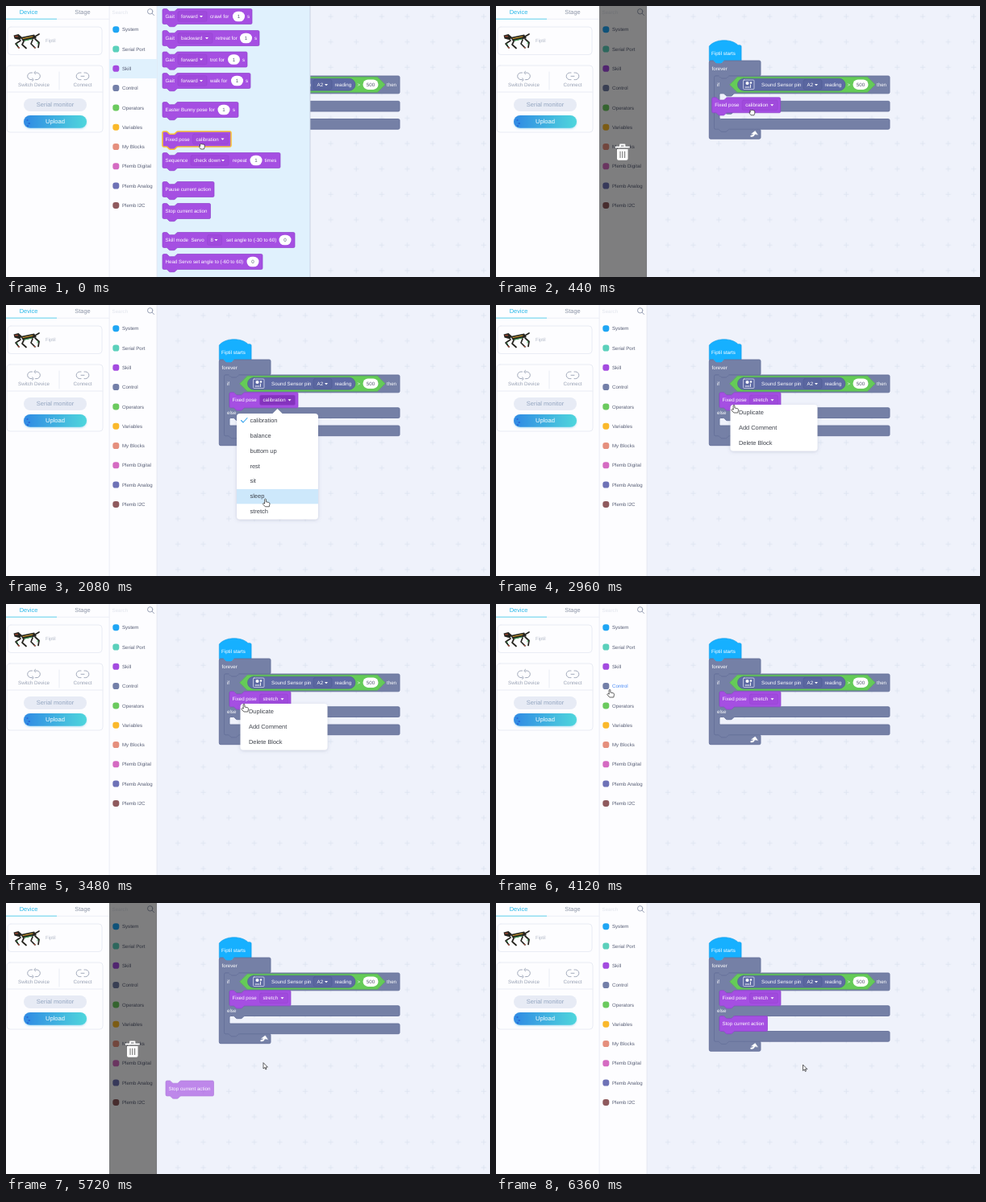
These frames come from a looping animation (600x337 px, 6.56 s). An HTML page:

```html
<!DOCTYPE html>
<html lang="en">
<head>
<meta charset="utf-8">
<title>Block editor</title>
<style>
html, body { margin: 0; width: 100%; height: 100%; overflow: hidden; background: #eff2fb; }
svg { display: block; width: 600px; height: 337px; }
text { font-family: "Liberation Sans", Arial, sans-serif; white-space: pre; text-rendering: geometricPrecision; }
</style>
</head>
<body>
<svg id="stage" viewBox="0 0 600 337" xmlns="http://www.w3.org/2000/svg">
  <defs>
    <pattern id="grid" x="197" y="-3" width="31.6" height="31.6" patternUnits="userSpaceOnUse">
      <path d="M12.8 16h6.4M16 12.8v6.4" stroke="#dbe1ef" stroke-width=".8"/>
    </pattern>
    <linearGradient id="upload"><stop stop-color="#2f8ae4"/><stop offset="1" stop-color="#4fd6dc"/></linearGradient>
    <filter id="shadow" x="-10%" y="-10%" width="120%" height="125%">
      <feDropShadow dx="0" dy="1" stdDeviation="2" flood-color="#5a6488" flood-opacity=".25"/>
    </filter>
    <filter id="glow" x="-10%" y="-30%" width="120%" height="180%">
      <feDropShadow dx="0" dy="1" stdDeviation="1.3" flood-color="#6cc4ea" flood-opacity=".5"/>
    </filter>
  </defs>
  <rect width="600" height="337" fill="#eff2fb"/>
  <rect x="187" width="413" height="337" fill="url(#grid)"/>
  <g id="script"></g>
  <g id="flyout"></g>
  <g id="categories"></g>
  <g id="trash"></g>
  <g id="device"></g>
  <g id="dragged"></g>
  <g id="menu"></g>
  <g id="cursor"></g>
</svg>
<script>
const LOOP = 6560;
const PURPLE = '#a54fe2', SLATE = '#7580a6', SLATE_EDGE = '#66719a', PANEL = '#fdfdff';

// ---- drawing helpers ----
const text = (x, cy, s, fill = '#fff', size = 6.2, anchor = 'start') =>
  `<text x="${x}" y="${cy + size * .35}" fill="${fill}" text-anchor="${anchor}" font-size="${size}">${s}</text>`;
const rect = (x, y, w, h, r, fill, extra = '') =>
  `<rect x="${x}" y="${y}" width="${w}" height="${h}" rx="${r}" fill="${fill}" ${extra}/>`;
const path = (d, fill, extra = '') => `<path d="${d}" fill="${fill}" ${extra}/>`;
const stroke = (color, width) => `stroke="${color}" stroke-width="${width}" stroke-linejoin="round" stroke-linecap="round"`;
const caret = (x, cy) => path(`M${x - 2} ${cy - 1}h4l-2 2.3z`, '#fff');

const NOTCH = 'c.8 0 1.2.4 1.6.8l1.6 1.6c.4.4.8.8 1.6.8h4.7c.8 0 1.2-.4 1.6-.8l1.6-1.6c.4-.4.8-.8 1.6-.8';
const NUB = 'c-.8 0-1.2.4-1.6.8l-1.6 1.6c-.4.4-.8.8-1.6.8h-4.7c-.8 0-1.2-.4-1.6-.8l-1.6-1.6c-.4-.4-.8-.8-1.6-.8';
const topEdge = (x, y, w) => `M${x} ${y + 1.6}a1.6 1.6 0 0 1 1.6-1.6h3.1${NOTCH}H${x + w - 1.6}a1.6 1.6 0 0 1 1.6 1.6`;
const bottomEdge = (x, y, nub) => `V${y - 1.6}a1.6 1.6 0 0 1-1.6 1.6` +
  (nub ? `H${x + 19}${NUB}` : '') + `H${x + 1.6}a1.6 1.6 0 0 1-1.6-1.6z`;

const stackPath = (x, y, w, h) => topEdge(x, y, w) + bottomEdge(x, y + h, true);

// slots: [top, bottom] of each mouth of a C-shaped block
function cPath(x, y, w, slots, bottom, nub) {
  const arm = x + 6.5;
  const mouths = slots.map(([a, b]) =>
    `V${a - 1.6}a1.6 1.6 0 0 1-1.6 1.6H${arm + 19}${NUB}H${arm + 1.6}a1.6 1.6 0 0 0-1.6 1.6` +
    `V${b - 1.6}a1.6 1.6 0 0 0 1.6 1.6H${x + w - 1.6}a1.6 1.6 0 0 1 1.6 1.6`).join('');
  return topEdge(x, y, w) + mouths + bottomEdge(x, bottom, nub);
}

// ---- purple blocks; parts: string label, dropdown {w, drop}, number {num} ----
function purpleBlock(x, y, w, parts, hover) {
  const cy = y + 9.5;
  const body = path(stackPath(x, y, w, 19), PURPLE, hover ? stroke('#f8c034', 1.6) : stroke('#8f42ca', .7));
  return body + parts.map(([dx, part]) => {
    const px = x + dx;
    if (typeof part === 'string') return text(px, cy, part);
    if (part.num) return rect(px, cy - 6.3, 15, 12.6, 6.3, '#fff') + text(px + 7.5, cy, part.num, '#575e75', 6.2, 'middle');
    return rect(px, cy - 6.3, part.w, 12.6, 1.8, part.open ? '#8433bd' : '#a04adc', stroke('#9342cf', .5)) +
      text(px + 4, cy, part.drop) + caret(px + part.w - 7, cy);
  }).join('');
}
const drop = (w, label, open) => ({ w, drop: label, open });
const num = n => ({ num: n });
const fixedPose = (x, y, label, open, hover) => {
  const w = label === 'stretch' ? 35 : 44;
  return purpleBlock(x, y, w + 41, [[3.5, 'Fixed pose'], [37.5, drop(w, label, open)]], hover);
};
const stopAction = (x, y, hover) => purpleBlock(x, y, 59.5, [[3.5, 'Stop current action']], hover);

const gait = (cy, way, dw, verb, at) =>
  [cy, at + 24, [[3.5, 'Gait'], [19, drop(dw, way)], [23 + dw, verb + ' for'], [at, num('1')], [at + 18, 's']]];
const SKILLS = [
  gait(13, 'forward', 36, 'crawl', 87),
  gait(40, 'backward', 43, 'retreat', 96),
  gait(66.5, 'forward', 36, 'trot', 81),
  gait(93, 'forward', 36, 'walk', 85),
  [129, 94, [[3.5, 'Easter Bunny pose for'], [68.5, num('1')], [87, 's']]],
  [192, 146, [[3.5, 'Sequence'], [35, drop(47, 'check down')], [87, 'repeat'], [108.5, num('1')], [126.5, 'times']]],
  [228, 64, [[3.5, 'Pause current action']]],
  [291, 164, [[3.5, 'Skill mode  Servo'], [55.5, drop(18, '8')], [79, 'set angle to (-30 to 60)'], [144.5, num('0')]]],
  [318, 124, [[3.5, 'Head Servo set angle to (-60 to 60)'], [104.5, num('0')]]],
];
const FIXED = { x: 194, y: 156 }, STOP = { x: 194, y: 245.5 };

function flyout(hover, missing) {
  return rect(187, 0, 190, 337, 0, '#e0f1fd') + path('M377 0V337', 'none', stroke('#c3cbdc', .8)) +
    SKILLS.map(([cy, w, parts]) => purpleBlock(194, cy - 9.5, w, parts)).join('') +
    (missing === 'fixed' ? '' : fixedPose(FIXED.x, FIXED.y, 'calibration', false, hover === 'fixed')) +
    (missing === 'stop' ? '' : stopAction(STOP.x, STOP.y, hover === 'stop'));
}

// ---- workspace script ----
function script(pose, open, stopped) {
  const elseTop = pose ? 127.8 : 118.3, elseEnd = elseTop + 12.7;
  const last = elseEnd + (stopped ? 19 : 9.5), end = last + 12.7;
  const edge = stroke(SLATE_EDGE, .9);
  return path('M264.3 68V50C272 40.5 292 40.5 300 48.7H302.5a1.6 1.6 0 0 1 1.6 1.6V68z', '#16b0ff', stroke('#139de8', .6)) +
    path(cPath(264.3, 68, 63.7, [[87, end]], end + 12, false), SLATE, edge) +
    path(cPath(270.5, 87, 217.5, [[108.8, elseTop], [elseEnd, last]], end, true), SLATE, edge) +
    path('M264.3 68h4.7' + NOTCH + 'z', '#16b0ff') +
    text(267, 59, 'Fiptil starts') + text(267.5, 77.5, 'forever') +
    text(274, 98, 'if') + text(274, elseTop + 6, 'else') + text(472, 98, 'then') +
    path('M289.8 97.7l9.5-9.5H460.5l9.5 9.5-9.5 9.5H299.3z', '#65cb58', stroke('#52b548', .6)) +
    rect(299.5, 90.2, 133.5, 15, 7.5, '#5f6ba5', stroke('#4d5890', .6)) +
    rect(306.5, 92, 13.5, 11.5, 1, '#5f6ba5', stroke('#e6e9f5', .7)) +
    '<circle cx="311.5" cy="96" r="2" fill="#fff"/><circle cx="316" cy="95.5" r="1.2" fill="#fff"/>' +
    path('M309 101h5M315.5 98v3.5', 'none', stroke('#fff', .9)) +
    text(329, 98, 'Sound Sensor pin') +
    rect(381, 91.8, 23, 11.8, 1.8, '#5a66a0', stroke('#4d5890', .5)) + text(385.5, 98, 'A2') + caret(397, 98) +
    text(407.5, 98, 'reading') + text(435.5, 98, '&gt;') +
    rect(442.5, 91.5, 19, 12.4, 6.2, '#fff') + text(452, 98, '500', '#575e75', 6.2, 'middle') +
    path(`M316.3 ${end + 8.6}q3.9 0 3.9-4`, 'none', stroke('#fff', 1.9)) +
    path(`M316.9 ${end + 5.6}l4.4-3.4 3 4.4z`, '#fff', stroke('#fff', .5)) +
    (pose ? fixedPose(277, 108.8, pose, open) : '') +
    (stopped ? stopAction(277, elseEnd) : '');
}

// ---- side panels ----
const CATEGORIES = [['System', '#1fa6f4'], ['Serial Port', '#5bd0bb'], ['Skill', '#a44be0'], ['Control', '#737fa8'],
  ['Operators', '#6bca5e'], ['Variables', '#fab92b'], ['My Blocks', '#e58f7d'], ['Plemb Digital', '#d56bc2'],
  ['Plemb Analog', '#6e72b6'], ['Plemb I2C', '#8f5a5d']];

function categories(hovered, isOpen) {
  return rect(128, 0, 59, 337, 0, PANEL) + path('M128 0V337M187 0V337', 'none', stroke('#e2e5ef', .8)) +
    (isOpen ? rect(128, 66, 59, 24, 0, '#e0f1fd') : '') +
    text(131.5, 7.5, 'Search', '#e1e4ec') +
    path('M181.2 9.3l2.3 2.3M181.9 6.8a3.2 3.2 0 1 1-6.4 0a3.2 3.2 0 1 1 6.4 0', 'none', stroke('#8d96ac', .9)) +
    CATEGORIES.map(([name, color], i) => {
      const cy = 29.2 + 24.3 * i;
      return rect(132.3, cy - 4, 8, 8, 3.1, color) +
        text(144, cy, name, name === hovered ? '#4a8bf5' : '#575e75', 6.1);
    }).join('');
}

function device() {
  const grey = '#98a1b3', card = stroke('#e9ecf4', 1);
  const link = x => path(`M${x - 2} 83h-1.500a4.300 4.300 0 0 0 0 8.600h1.500M${x + 2} 83h1.500a4.300 4.300 0 0 1 0 8.600h-1.500`, 'none', stroke('#a2aabb', 1));
  return rect(0, 0, 127.6, 337, 0, PANEL) + path('M0 16.3H127.5', 'none', stroke('#e9ecf4', .8)) +
    rect(0, 15.6, 63, 1.2, 0, '#7cdaf1') +
    text(28, 7, 'Device', '#27b8e8', 7.4, 'middle') + text(95, 7, 'Stage', '#8b93a5', 7.4, 'middle') +
    rect(2, 26, 117, 34.5, 4, PANEL, card) + dog() + text(49, 43, 'Fiptil', '#b3bac8', 6) +
    rect(1, 74, 119, 83, 4, PANEL, card) + path('M1 107H120M66 82V104', 'none', card) +
    link(34.5) + link(95) + path('M93 87.3h4M36.5 81.3l-1.800 1.700 1.800 1.700M32.500 89.900l1.800 1.700-1.800 1.700', 'none', stroke('#a2aabb', 1)) +
    text(34.5, 97.8, 'Switch Device', grey, 6.2, 'middle') + text(95, 97.8, 'Connect', grey, 6.2, 'middle') +
    rect(22, 115, 78, 16, 8, '#e7ebf5') + text(61, 122.7, 'Serial monitor', '#93a5c0', 7.5, 'middle') +
    `<g filter="url(#glow)">${rect(22, 136, 78, 15.8, 7.9, 'url(#upload)')}</g>` + text(61, 143.7, 'Upload', '#fff', 7.6, 'middle') +
    path('M26 142h1M28 146h1.5M26.5 149h1', 'none', stroke('#2448c8', 1));
}

function dog() {
  return path('M18 43l-6 4 4 5M22 44l-2 4 5 4.5M33 42l-2 5 5 5M36 41l5 4.500-1 6M36 38l5-3', 'none', stroke('#25241f', 1.7)) +
    path('M9.5 36.500l6-1.500 4 3.500-2 4-7-2zM18 39l17-3.500 3 4.500-17 4z', '#25241f') +
    path('M21 40.5l12-2.500', 'none', stroke('#e0a92e', 1)) +
    path('M13.500 47l1 1.500M39.500 45l-.500 2M23 43l9-2', 'none', stroke('#3fa85a', 1)) +
    path('M11.500 37.800h3M15 51.800h1.500M35 51.800h1', 'none', stroke('#d1573c', 1));
}

const trash = () => rect(128, 0, 59, 337, 0, '#000', 'opacity=".5"') +
  path('M148.5 175.5h16.5M154 175v-2.5h5.5v2.5', 'none', stroke('#fff', 1.8)) +
  path('M150 178h13.5v12q0 1.8-1.8 1.8h-9.9q-1.8 0-1.8-1.8z', '#fff') +
  path('M154 181v7.5M156.8 181v7.5M159.6 181v7.5', 'none', stroke('#777', 1.1));

// ---- popups ----
const POSES = ['calibration', 'balance', 'buttom up', 'rest', 'sit', 'sleep', 'stretch'];
const MENU_TOP = 134, ROW = 18.85;

function poseMenu(row) {
  return `<g filter="url(#shadow)">${path('M330 135.5l6.5-6.5 6.5 6.5z', '#fff')}${rect(286, 135, 101, 131.5, 4, '#fff')}</g>` +
    (row >= 0 ? rect(286, MENU_TOP + row * ROW + .7, 101, ROW - .5, 0, '#cde8fb') : '') +
    path('M291.5 143.5l2.5 2.5 5-5.5', 'none', stroke('#3aa5ee', 1.1)) +
    POSES.map((p, i) => text(302.5, 143.4 + i * ROW, p, '#3f434c', 7.45)).join('');
}
const contextMenu = () => `<g filter="url(#shadow)">${rect(290.5, 124, 108, 57.5, 4, '#fff')}</g>` +
  ['Duplicate', 'Add Comment', 'Delete Block'].map((s, i) => text(301, 133.3 + i * 19.2, s, '#3f434c', 7.4)).join('');

const CURSORS = {
  arrow: path('M0 0V7l1.7-1.5 1.2 2.5 1.1-.5-1.2-2.4h2.2z', '#fff', stroke('#222', .7)),
  point: path('M-.9 5.7V.9q.9-1.3 1.8 0V4l3.200.700q1.500.400 1.400 1.800l-.700 3.500H-.200l-3-3.400q.200-1.500 2.300-.900z', '#fff', stroke('#222', .7)),
  grab: path('M-1.5 4V2q.8-.9 1.5 0q.8-.8 1.5 0q.9-.6 1.5.3q1.2-.3 1.2 1v2.2L3.3 8H-.5L-2.5 5.3q0-1.3 1-1.3z', '#fff', stroke('#222', .7)),
};

// ---- motion ----
const ease = u => u * u * (3 - 2 * u);
function along(keys, t) {
  const i = keys.findIndex(k => k[0] > t);
  if (i < 0) return keys[keys.length - 1].slice(1);
  if (i === 0) return keys[0].slice(1);
  const a = keys[i - 1], b = keys[i], u = ease((t - a[0]) / (b[0] - a[0]));
  return [a[1] + (b[1] - a[1]) * u, a[2] + (b[2] - a[2]) * u];
}
const POINTER = [[0, 242, 170], [120, 242, 170], [520, 325, 123], [640, 326, 123], [800, 323, 119], [900, 323, 119],
  [1120, 338, 171], [1360, 336, 178], [1700, 328, 208], [2040, 322, 238], [2200, 319, 255], [2320, 319, 255],
  [2720, 295, 124], [3480, 295, 124], [4000, 147, 107], [4120, 141, 106], [4360, 148, 79], [4480, 148, 79],
  [4760, 215, 165], [4840, 214.5, 166], [5240, 234, 252], [5480, 235, 253], [5720, 319, 199], [6040, 318, 150],
  [6160, 318, 148], [6360, 380.5, 201.5]];
const FIXED_DRAG = [[120, FIXED.x, FIXED.y], [520, 276, 109], [600, 277, 108.8]];
const STOP_DRAG = [[5480, STOP.x, STOP.y], [5720, 198, 221], [6040, 276, 141], [6160, 277, 140.5]];

const shown = {};
function put(id, html) {
  if (shown[id] !== html) document.getElementById(id).innerHTML = shown[id] = html;
}

function render(t) {
  const during = (a, b) => t >= a && t < b;
  const [x, y] = along(POINTER, t);
  const dragFixed = during(120, 600), dragStop = during(5520, 6180);
  const dragging = dragFixed || dragStop;
  const flyoutOpen = t < 160 || during(4480, 5560);
  const menuOpen = during(900, 2280);

  put('script', script(t < 600 ? '' : t < 2280 ? 'calibration' : 'stretch', menuOpen, t >= 6180));

  const overFixed = t < 160 || (x > 194 && x < 280 && y > 155 && y < 176);
  const overStop = x > 194 && x < 254 && y > 245;
  const missing = dragFixed ? 'fixed' : dragStop ? 'stop' : '';
  put('flyout', flyoutOpen ? flyout(overFixed ? 'fixed' : overStop ? 'stop' : '', missing) : '');

  const row = Math.round((y - 29.2) / 24.3);
  put('categories', categories(x < 187 && CATEGORIES[row] ? CATEGORIES[row][0] : '', flyoutOpen));
  put('trash', dragging ? trash() : '');

  if (dragging) {
    const [bx, by] = along(dragFixed ? FIXED_DRAG : STOP_DRAG, t);
    const block = dragFixed ? fixedPose(bx, by, 'calibration') : stopAction(bx, by);
    put('dragged', `<g opacity="${bx < 230 ? .65 : 1}">${block}</g>`);
  } else put('dragged', '');

  put('menu', menuOpen ? poseMenu(Math.floor((y + .5 - MENU_TOP) / ROW)) : during(2840, 3520) ? contextMenu() : '');

  const shape = t >= 5600 || during(3620, 3900) ? 'arrow' : t < 640 || t >= 4720 ? 'grab' : 'point';
  put('cursor', CURSORS[shape]);
  document.getElementById('cursor').setAttribute('transform', `translate(${x.toFixed(2)} ${y.toFixed(2)})`);
}

put('device', device());
const start = performance.now();
function frame() {
  render((performance.now() - start) % LOOP);
  requestAnimationFrame(frame);
}
frame();
</script>
</body>
</html>
```
